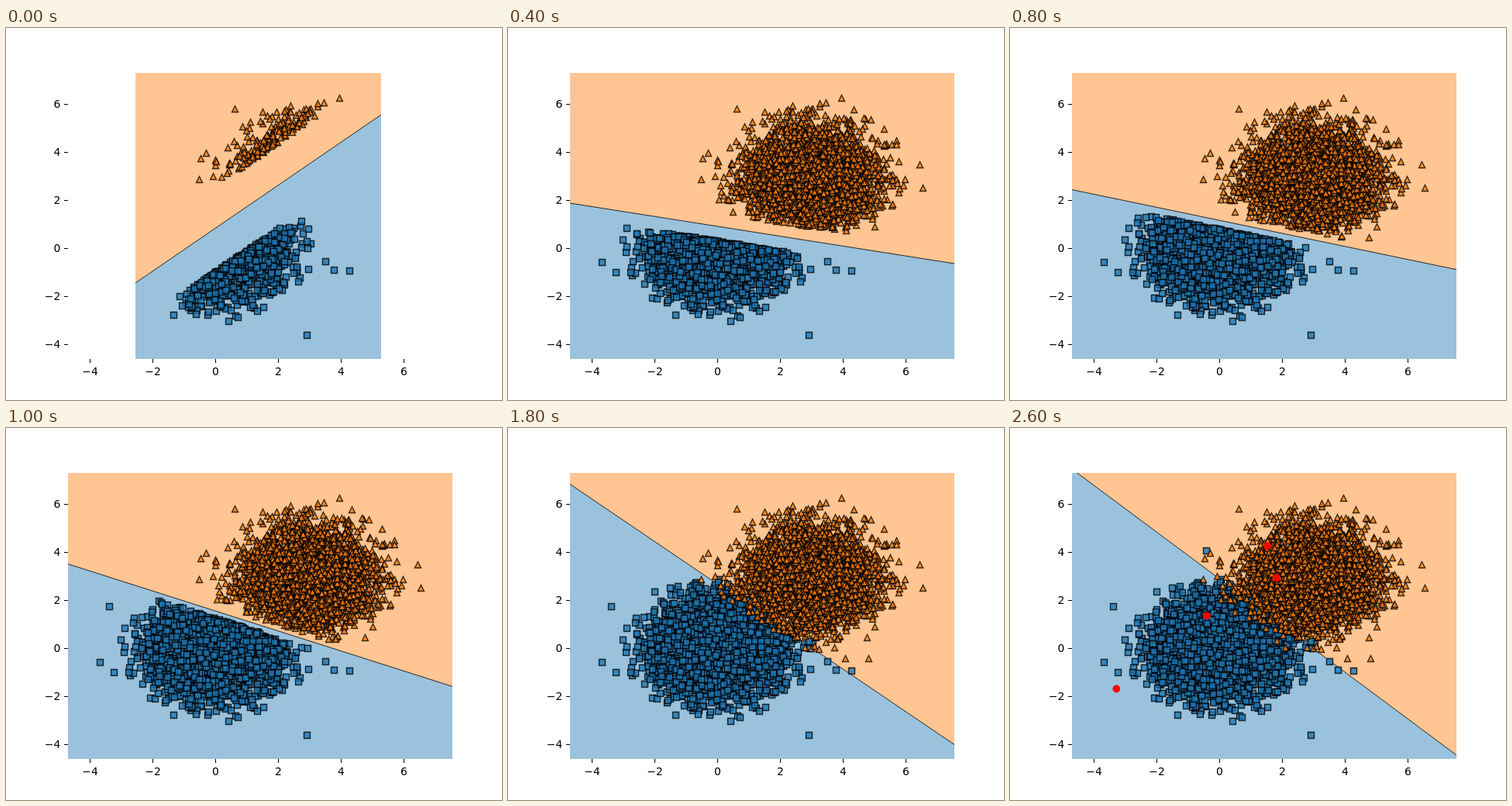
An HTML page with a canvas for the animation above (2.8 s loop, 640x480 px).

```html
<!DOCTYPE html>
<html lang="en">
<head>
<meta charset="utf-8">
<title>Decision regions</title>
<style>
  html, body { margin: 0; width: 100%; height: 100%; overflow: hidden; background: #fff; }
  canvas, svg { position: absolute; left: 0; top: 0; display: block; }
  text { font: 13.89px "DejaVu Sans", sans-serif; fill: #000; }
</style>
</head>
<body>
<canvas id="plot" width="640" height="480"></canvas>
<svg id="axes" width="640" height="480"></svg>
<script>
const STEP = 200, STEPS = 14, COUNT = 3500, REACH = 3.1;
const LEFT = 80, RIGHT = 576, TOP = 58, BOTTOM = 427;
const ORIGIN = { x: 270, y: 284 }, UNIT = { x: 40.5, y: 31 };
const ctx = document.getElementById('plot').getContext('2d');

// Boundary key poses: step, height at LEFT, height at RIGHT
const poses = [
  [0, 388.5, 49], [1, 290, 228], [2, 226, 304], [3, 232, 297], [5, 175.5, 333.5],
  [7, 103.5, 383.5], [9, 72.5, 408.5], [11, 59, 419], [13, 53, 422]
];

// Smooth curve through the key poses
function boundary(step) {
  let i = 0;
  while (i < poses.length - 2 && poses[i + 1][0] <= step) i++;
  const at = n => poses[Math.max(0, Math.min(poses.length - 1, n))];
  const [a, b, c, d] = [at(i - 1), at(i), at(i + 1), at(i + 2)];
  const u = (step - b[0]) / (c[0] - b[0]);
  const mix = n => b[n] + u / 2 * (c[n] - a[n]
    + u * (2 * a[n] - 5 * b[n] + 4 * c[n] - d[n]
    + u * (3 * (b[n] - c[n]) + d[n] - a[n])));
  const y0 = mix(1), y1 = mix(2);
  return x => y0 + (y1 - y0) * (x - LEFT) / (RIGHT - LEFT);
}

// Points closer to the boundary than this are held back; it ends below zero
const margin = step => 56 / (step + 1) - 5 * Math.max(0, step - 6);

function seeded(seed) {
  return () => {
    seed = (seed + 0x6D2B79F5) | 0;
    let t = Math.imul(seed ^ (seed >>> 15), 1 | seed);
    t = (t + Math.imul(t ^ (t >>> 7), 61 | t)) ^ t;
    return ((t ^ (t >>> 14)) >>> 0) / 4294967296;
  };
}

// Normal cloud around (mean, mean), plus a few far points
function cloud(mean, seed, far) {
  const rand = seeded(seed), points = [...far];
  while (points.length < COUNT) {
    const r = Math.sqrt(-2 * Math.log(1 - rand()));
    const a = 2 * Math.PI * rand();
    if (r > REACH) continue;
    points.push([
      Math.round(ORIGIN.x + UNIT.x * (mean + r * Math.cos(a))),
      Math.round(ORIGIN.y - UNIT.y * (mean + r * Math.sin(a)))
    ]);
  }
  return points;
}

const groups = [
  {
    color: '#1f77b4', side: 1, shape: new Path2D('M-4-4H4V4H-4Z'),
    points: cloud(0, 11, [[121, 302], [133, 230], [139, 315], [388, 396],
      [443, 313], [423, 312], [412, 301], [253, 158]])
  },
  {
    color: '#ff7f0e', side: -1, shape: new Path2D('M0-4L4 4H-4Z'),
    points: cloud(3, 29, [[258, 161], [251, 168], [249, 195], [254, 243], [295, 104],
      [430, 90], [531, 176], [535, 206], [435, 297], [465, 297]])
  }
];
const dots = [[332.3, 152.5], [343.7, 193.5], [254, 242.3], [137.3, 336.5]];

function drawRegions(step) {
  const line = boundary(step);
  const x0 = [167, 98][step] ?? LEFT, x1 = [484, 562][step] ?? RIGHT;
  ctx.save();
  ctx.beginPath();
  ctx.rect(x0, TOP, x1 - x0, BOTTOM - TOP);
  ctx.clip();
  ctx.fillStyle = '#ffc592';
  ctx.fillRect(x0, TOP, x1 - x0, BOTTOM - TOP);
  const edge = new Path2D(`M${x0} ${line(x0)}L${x1} ${line(x1)}`);
  const below = new Path2D(edge);
  below.lineTo(x1, BOTTOM);
  below.lineTo(x0, BOTTOM);
  ctx.fillStyle = '#9ac2dd';
  ctx.fill(below);
  ctx.lineWidth = 0.8;
  ctx.stroke(edge);
  ctx.restore();
}

function drawMarkers(step) {
  // The first pick stays visible for one more step
  const rules = (step === 1 ? [0, 1] : [step])
    .map(s => ({ line: boundary(s), gap: margin(s) }));
  ctx.save();
  ctx.globalAlpha = 0.8;
  ctx.lineWidth = 1.39;
  for (const { points, shape, color, side } of groups) {
    ctx.fillStyle = color;
    for (const [x, y] of points) {
      if (!rules.some(r => side * (y - r.line(x)) > r.gap)) continue;
      ctx.setTransform(1, 0, 0, 1, x + 0.5, y + 0.5);
      ctx.fill(shape);
      ctx.stroke(shape);
    }
  }
  ctx.restore();
}

function drawDots() {
  ctx.fillStyle = '#f00';
  for (const [x, y] of dots) {
    ctx.beginPath();
    ctx.arc(x, y, 4.9, 0, 2 * Math.PI);
    ctx.fill();
  }
}

function draw(step) {
  ctx.clearRect(0, 0, 640, 480);
  drawRegions(step);
  drawMarkers(step);
  if (step === STEPS - 1) drawDots();
}

function buildAxes() {
  let out = '';
  for (let v = -4; v <= 6; v += 2) {
    const label = String(v).replace('-', '\u2212');
    const x = ORIGIN.x + UNIT.x * v, y = ORIGIN.y - UNIT.y * v;
    out += `<rect x="${x}" y="${BOTTOM}" width="1" height="5"/>` +
      `<text x="${x + 0.5}" y="448" text-anchor="middle">${label}</text>` +
      `<rect x="${LEFT - 5}" y="${y}" width="5" height="1"/>` +
      `<text x="70.3" y="${y + 5}" text-anchor="end">${label}</text>`;
  }
  document.getElementById('axes').innerHTML = out;
}

let shown = -1;
function tick() {
  const step = Math.floor(performance.now() / STEP) % STEPS;
  if (step !== shown) draw(shown = step);
  requestAnimationFrame(tick);
}

buildAxes();
tick();
</script>
</body>
</html>
```
